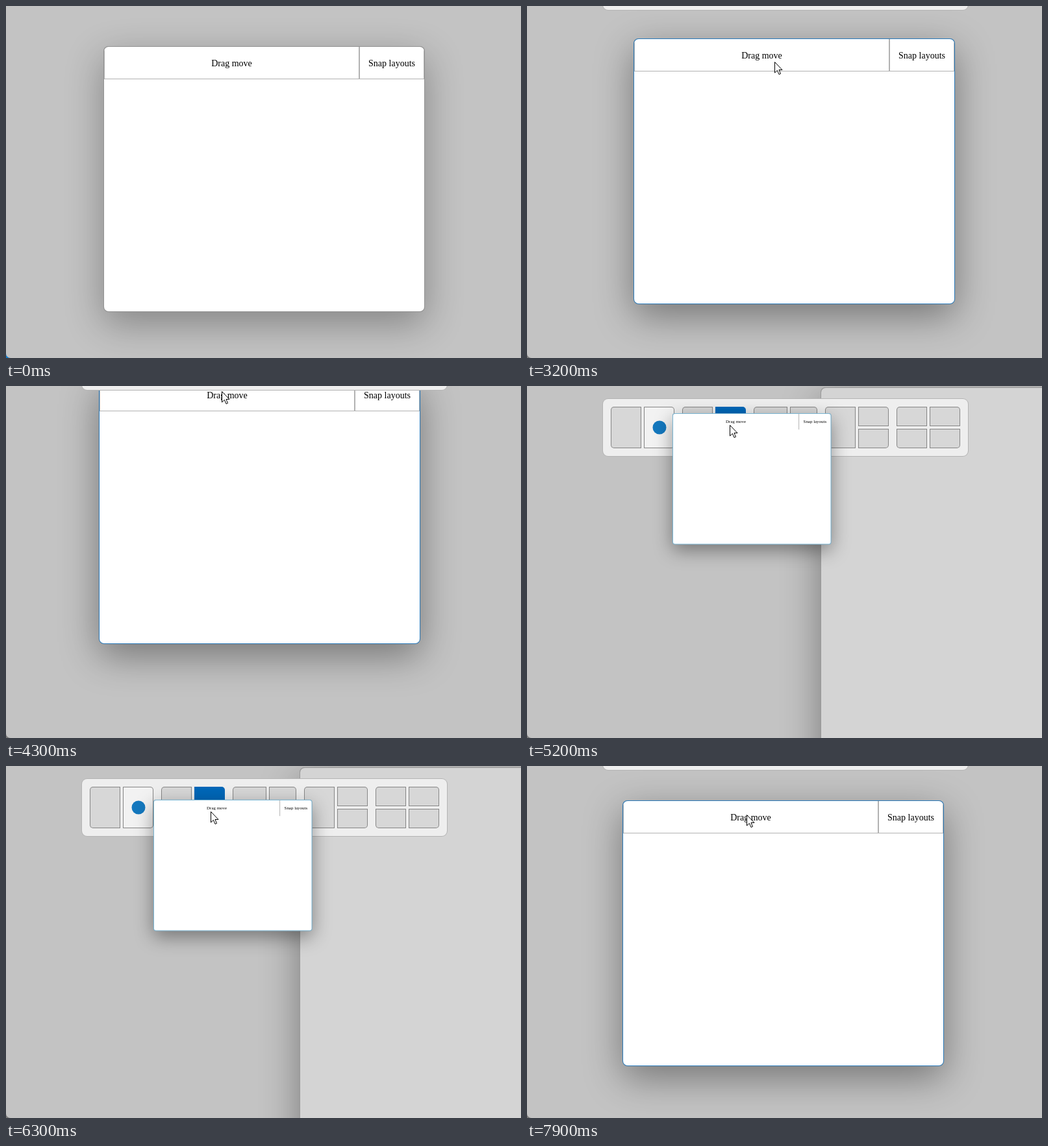
Recreate the animation shown at these times as an HTML page with a canvas. Size 793x543 px, loop 8000 ms.

```html
<!DOCTYPE html>
<html lang="en">
<head>
<meta charset="utf-8">
<title>Snap layouts</title>
<style>
html, body { margin: 0; width: 793px; height: 543px; overflow: hidden; background: #c3c3c3; }
canvas { display: block; }
</style>
</head>
<body>
<canvas id="stage" width="793" height="543"></canvas>
<script>
const ctx = document.getElementById('stage').getContext('2d');
const LOOP = 8000, STEP = 100;
const WIN_W = 495, WIN_H = 410, THUMB = 0.494;
const DRAG_START = 1900;

const mix = (a, b, k) => a + (b - a) * k;
const part = (t, from, to) => Math.min(1, Math.max(0, (t - from) / (to - from)));
const ease = (t, from, to) => 1 - (1 - part(t, from, to)) ** 3;
const smooth = (t, from, to) => {
  const k = part(t, from, to);
  return k * k * (3 - 2 * k);
};

// Stops of the pointer after its entry: time, x, y
const stops = [
  [1500, 431, 193], [1850, 340, 83], [2200, 342, 78.4], [3900, 342, 78.4],
  [4240, 333, 9], [4300, 332, 8], [4600, 332, 8], [5200, 312, 60],
  [5600, 278, 59], [6200, 314, 64], [6800, 330, 151], [7100, 333, 149],
  [7700, 336, 73], [8000, 339, 76]
];

function enterCurve(t) {
  const k = part(t, 100, 1100), j = 1 - k;
  const bend = (a, b, c) => j * j * a + 2 * j * k * b + k * k * c;
  return [bend(738, 535, 431), bend(120, 238, 193)];
}

function pointerAt(t) {
  if (t < 1500) return enterCurve(t);
  let [, x, y] = stops[0];
  stops.forEach(([end, nx, ny], i) => {
    if (!i) return;
    const k = smooth(t, stops[i - 1][0], end);
    x = mix(x, nx, k);
    y = mix(y, ny, k);
  });
  // Shaking the window from side to side
  const shake = smooth(t, 2200, 2600) - smooth(t, 3800, 4200);
  const angle = (t - 3114) / 900 * 2 * Math.PI;
  return [x + 69 * shake * Math.sin(angle), y + 18.5 * shake * Math.sin(2 * angle - 0.78)];
}

function layoutCells() {
  const layouts = [[47, 1, 1], [47, 1, 1], [52, 1, 1], [47, 1, 2], [47, 2, 2]];
  const cells = [];
  layouts.forEach(([split, ...rowCounts], group) => rowCounts.forEach((rows, col) => {
    const x = 129 + 110 * group + col * (split + 4);
    const w = col ? 94 - split : split;
    const h = rows > 1 ? 30 : 64;
    for (let row = 0; row < rows; row++) {
      const top = row === 0 ? 5 : 0, bottom = row === rows - 1 ? 5 : 0;
      const r = col ? [0, top, bottom, 0] : [top, 0, 0, bottom];
      cells.push({ x, y: 32 + 34 * row, w, h, r });
    }
  }));
  return cells;
}
const cells = layoutCells(), APP_CELL = 1;

function box(x, y, w, h, r, fill) {
  ctx.beginPath();
  ctx.roundRect(x, y, w, h, r);
  ctx.fillStyle = fill;
  ctx.fill();
}

function framed(x, y, w, h, r, edge, fill) {
  box(x, y, w, h, r, edge);
  const inner = [r].flat().map(v => Math.max(0, v - 1));
  box(x + 1, y + 1, w - 2, h - 2, inner, fill);
}

function castShadow(x, y, w, h, r, scale, alpha) {
  ctx.save();
  ctx.shadowColor = `rgba(0,0,0,${alpha})`;
  ctx.shadowBlur = 58 * scale;
  ctx.shadowOffsetY = 18 * scale;
  box(x, y, w, h, r, '#999');
  ctx.restore();
}

function drawBackground(t) {
  box(0, 530, 13, 13, 0, t < 1500 ? '#0f78c8' : '#777');
  box(0, 0, 793, 543, [0, 0, 0, 7], '#c3c3c3');
}

function drawWindow(x, y, scale, active) {
  const w = WIN_W * scale, h = WIN_H * scale, small = scale < 0.8;
  const r = small ? 4 : 8;
  castShadow(x, y, w, h, r, scale, active ? 0.4 : 0.32);
  framed(x, y, w, h, r, !active ? '#929292' : small ? '#78b4d2' : '#2878b8', '#fff');

  ctx.save();
  ctx.beginPath();
  ctx.roundRect(x + 1, y + 1, w - 2, h - 2, r - 1);
  ctx.clip();
  ctx.translate(x, y);
  ctx.scale(scale, scale);
  ctx.fillStyle = '#b2b2b2';
  ctx.fillRect(393, 1, 2, 50);
  if (!small) {
    ctx.fillRect(1, 50, 493, 1);
    ctx.fillRect(1, 1, 1, 50);
    ctx.fillRect(493, 1, 1, 50);
  }
  ctx.fillStyle = '#000';
  ctx.font = '14px "Liberation Serif", "Times New Roman", serif';
  ctx.textAlign = 'center';
  ctx.fillText('Drag move', 197.5, 31);
  ctx.fillText('Snap layouts', 444, 31);
  ctx.restore();
}

function drawBar(offset, px, py) {
  ctx.save();
  ctx.translate(0, Math.round(offset));
  framed(116, 19, 564, 90, 9, '#b4b4b4', '#eeeeee');
  cells.forEach(({ x, y, w, h, r }, i) => {
    const hot = offset > -5 && px >= x && px < x + w && py >= y && py < y + h;
    const fill = hot ? '#0067b8' : i === APP_CELL ? '#f2f2f2' : '#d7d7d7';
    framed(x, y, w, h, r, hot ? '#0067b8' : '#868686', fill);
  });
  ctx.beginPath();
  ctx.arc(204, 64, 10.5, 0, 2 * Math.PI);
  ctx.fillStyle = '#1478be';
  ctx.fill();
  ctx.restore();
}

function drawPreview(t) {
  if (t < 5000 || t >= 6500) return;
  const grow = ease(t, 4900, 5200);
  const inset = 60 * (1 - grow);
  const x = 452 - 400 * (ease(t, 5350, 5600) - ease(t, 5900, 6150));
  const area = [x + inset, 2 + inset, 393 - 2 * inset, 700 - 2 * inset, 8];
  ctx.save();
  ctx.globalAlpha = grow;
  castShadow(...area, 1, 0.38);
  framed(...area, '#999', '#d4d4d4');
  ctx.restore();
}

function drawPointer(x, y) {
  const outline = [[0, 0], [0, 16.5], [3.9, 12.9], [6.5, 19], [9, 18], [6.5, 12], [11.5, 12]];
  ctx.beginPath();
  for (const [dx, dy] of outline) ctx.lineTo(x + dx + 0.5, y + dy + 0.5);
  ctx.closePath();
  ctx.fillStyle = '#fff';
  ctx.fill();
  ctx.strokeStyle = '#000';
  ctx.lineWidth = 1;
  ctx.stroke();
}

function windowPlace(t, scale) {
  if (t < DRAG_START) return [150, 62];
  // The window trails the pointer unless it is carried as a thumbnail.
  const carried = ease(t, 4600, 4900) - ease(t, 6850, 7300);
  const [x, y] = pointerAt(t - 60 * (1 - carried));
  const grip = part(scale, THUMB, 1);
  return [
    Math.round(x - mix(190, mix(88, 188, grip), carried)),
    Math.round(y - mix(21, mix(18, 39.5, grip), carried))
  ];
}

function draw(t) {
  const [px, py] = pointerAt(t).map(Math.round);
  const scale = mix(1, THUMB, ease(t, 4600, 4900) - ease(t, 6500, 6920));
  const [wx, wy] = windowPlace(t, scale);
  const peek = ease(t, 2300, 2500);
  const open = ease(t, 4600, 4900) - ease(t, 7300, 7600);
  const barOffset = -110 + 8 * peek + 102 * open;
  const thumbnail = scale < 0.999;

  drawBackground(t);
  drawPreview(t);
  if (thumbnail) drawBar(barOffset, px, py);
  if (t >= 6700 && t < 6900) {
    framed(px - 187, py - 37, WIN_W, WIN_H, 8, '#8c8c8c', '#a4a4a4');
  }
  drawWindow(wx, wy, scale, t >= DRAG_START);
  if (!thumbnail) drawBar(barOffset, px, py);
  if (t >= 100) drawPointer(px, py);
}

const start = performance.now();
function tick() {
  const t = (performance.now() - start) % LOOP;
  ctx.clearRect(0, 0, 793, 543);
  draw(Math.floor(t / STEP) * STEP);
  requestAnimationFrame(tick);
}
tick();
</script>
</body>
</html>
```
